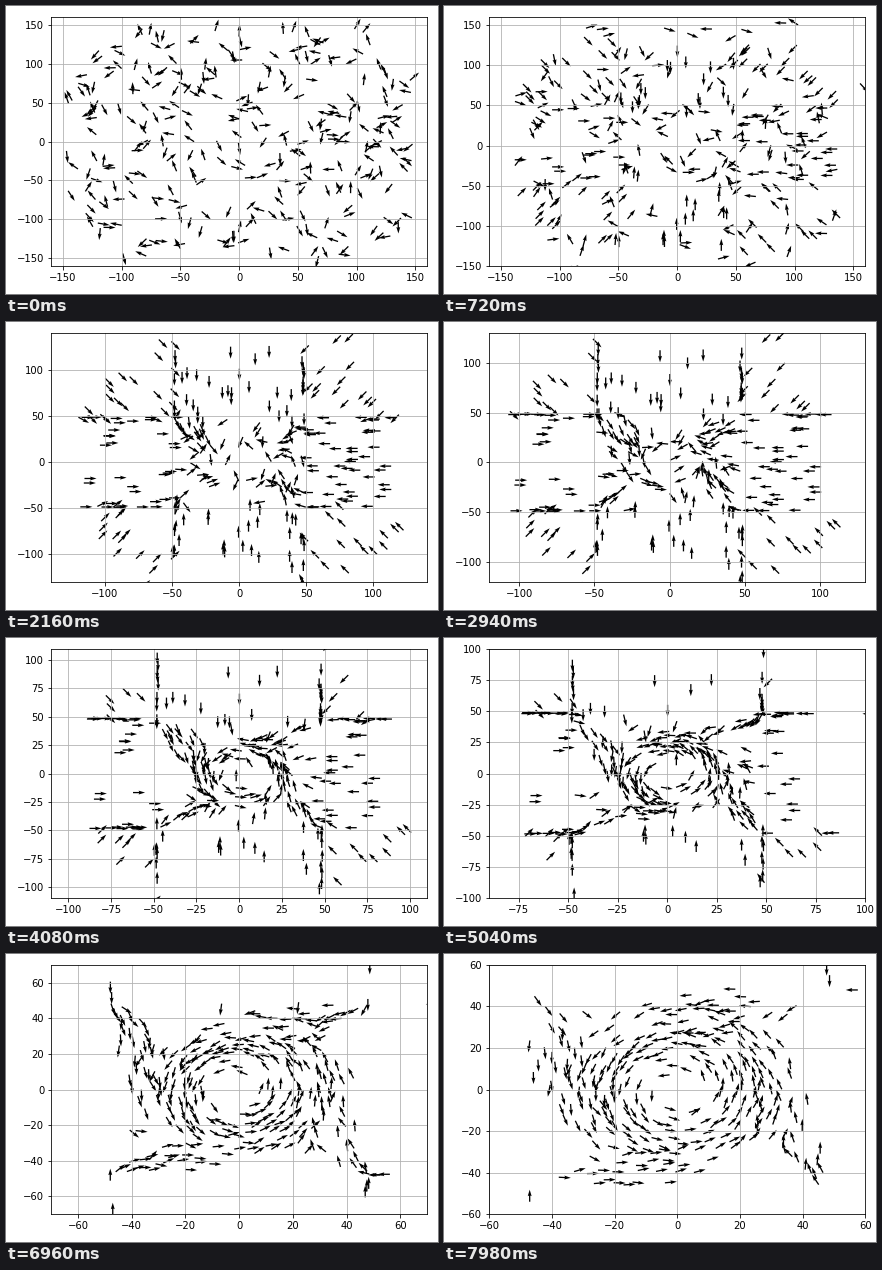
A matplotlib script for the animation above (8000 ms loop, 432 by 288 pixels).

```python
import numpy as np
import matplotlib.pyplot as plt
from matplotlib.animation import FuncAnimation

COUNT, STEPS, LOOP_MS = 300, 134, 8000
SPEED, BOX = 0.96, 50
rng = np.random.default_rng(4)

# Reach of the swarm on each side: size at the start, loss per step
REACH = {"left": (157, 0.86), "right": (158, 0.82),
         "bottom": (152, 0.775), "top": (156, 0.81)}


def limit(side, n):
    """Nearest ten above the shrinking reach, plus a margin of ten."""
    size, loss = REACH[side]
    reach = np.clip(size - loss * n, 50, 150)
    return 10 * np.floor(reach / 10 + 0.5) + 10


def start():
    """Uniform square with thinned far corners and random headings."""
    spots = rng.uniform(-148, 148, (COUNT * 2, 2))
    spots = spots[np.abs(spots).sum(axis=1) < 250][:COUNT]
    return spots[:, 0], spots[:, 1], rng.uniform(-np.pi, np.pi, COUNT)


def wanted(x, y, n, ring, bias):
    """Heading: straight back to the box outside it, a spiral inside it."""
    far_x, far_y = np.abs(x) > BOX, np.abs(y) > BOX
    outside = far_x | far_y
    r = np.hypot(x, y) + 1e-6
    radius = ring * (0.4 + 0.6 * min(n / 110, 1))
    width = np.interp(n, [60, 120], [20, 36])
    pull = np.clip((r - radius) / width, -0.8, 0.97)
    swirl = np.sqrt(1 - pull ** 2)
    home = np.arctan2(-np.sign(y) * far_y, -np.sign(x) * far_x)
    spiral = np.arctan2(-pull * y + swirl * x, -pull * x - swirl * y) + bias
    return np.where(outside, home, spiral), outside


def spread(x, y):
    """Small push away from close neighbours."""
    dx, dy = x[:, None] - x, y[:, None] - y
    gap = np.hypot(dx, dy) + 1e-6
    push = 0.22 * np.clip(1 - gap / 6, 0, 1) / gap
    return (dx * push).sum(axis=1), (dy * push).sum(axis=1)


def simulate():
    x, y, heading = start()
    ring = rng.uniform(11, 34, COUNT)
    bias = rng.normal(0, 0.18, COUNT)
    turn = rng.uniform(0.1, 0.19, COUNT)
    path = []
    for n in range(STEPS):
        path.append((x, y, heading))
        goal, outside = wanted(x, y, n, ring, bias)
        # Steering inside the box only builds up after a while
        most = turn * np.where(outside, 1, np.clip((n - 10) / 50, 0.12, 1))
        diff = (goal - heading + np.pi) % (2 * np.pi) - np.pi
        heading = heading + np.clip(diff, -most, most)
        px, py = spread(x, y)
        x = x + SPEED * np.cos(heading) + np.where(outside, 0, px)
        y = y + SPEED * np.sin(heading) + np.where(outside, 0, py)
    return path


path = simulate()

plt.rcParams["font.family"] = "DejaVu Sans"
fig, ax = plt.subplots(figsize=(6, 4), dpi=72)
ax.grid(True)
x, y, heading = path[0]
arrows = ax.quiver(x, y, np.cos(heading), np.sin(heading),
                   scale=1.8 * np.sqrt(COUNT), width=0.06 / np.sqrt(COUNT))


def draw(n):
    x, y, heading = path[n]
    arrows.set_offsets(np.column_stack([x, y]))
    arrows.set_UVC(np.cos(heading), np.sin(heading))
    ax.set_xlim(-limit("left", n), limit("right", n))
    ax.set_ylim(-limit("bottom", n), limit("top", n))
    return [arrows]


draw(0)
fig.tight_layout()

anim = FuncAnimation(fig, draw, frames=STEPS, interval=LOOP_MS / STEPS,
                     init_func=lambda: draw(0), repeat=True, repeat_delay=0)
plt.show()
```
